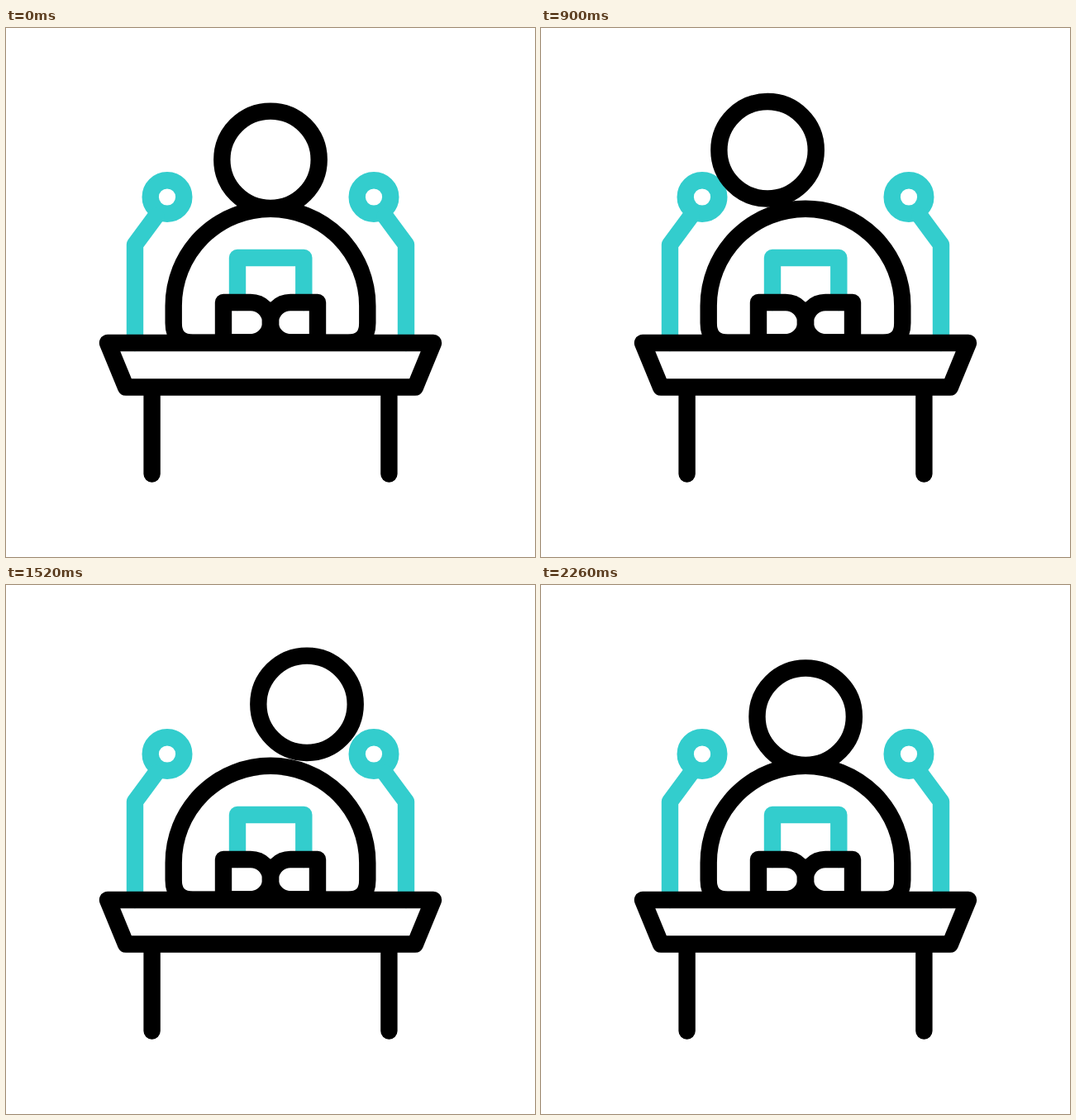
An HTML page for the animation above (2400 ms loop, 640 px wide and 640 px high).

```html
<!DOCTYPE html>
<html lang="en">
<head>
<meta charset="utf-8">
<title>Speaker at a desk</title>
<style>
  html, body { margin: 0; width: 100%; height: 100%; overflow: hidden; background: #fff; }
  svg { display: block; width: 100vw; height: 100vh; }
  .line { fill: none; stroke: #000; stroke-width: 20.4; stroke-linecap: round; stroke-linejoin: round; }
  .teal { stroke: #33cdcd; }
</style>
</head>
<body>
<svg viewBox="0 0 640 640">
  <defs>
    <g id="mic">
      <circle cx="195" cy="204.5" r="20.3"/>
      <path d="M181.5 227.5L156 262V381"/>
    </g>
    <path id="page" d="M263 332H296A24.2 24.2 0 0 1 296 380.4H263Z"/>
  </defs>
  <g class="line teal">
    <use href="#mic"/>
    <use href="#mic" transform="matrix(-1 0 0 1 640 0)"/>
  </g>
  <path class="line" d="M202.7 336A117.3 117.3 0 0 1 437.3 336V357Q437.3 380.6 414 380.6H226Q202.7 380.6 202.7 357Z"/>
  <circle id="head" class="line" cx="320" cy="159.3" r="58.7"/>
  <g id="book" class="line">
    <path class="teal" d="M280 332V278H360.3V332"/>
    <use href="#page"/>
    <use href="#page" transform="matrix(-1 0 0 1 640 0)"/>
  </g>
  <g class="line">
    <path d="M123 381H517L495 434.5H145Z"/>
    <path d="M176.6 436V539.5M463.4 436V539.5"/>
  </g>
</svg>
<script>
  const LOOP = 2400, STEP = 20;
  const head = document.getElementById('head');
  const book = document.getElementById('book');

  const part = (t, a, b) => Math.min(1, Math.max(0, (t - a) / (b - a)));
  const ease = (t, a, b) => (1 - Math.cos(Math.PI * part(t, a, b))) / 2;
  const pulse = (t, a, b, c, d) => ease(t, a, b) - ease(t, c, d);
  const nod = (t, a, b) => Math.sin(2 * Math.PI * part(t, a, b));
  const move = (el, x, y) => el.setAttribute('transform', `translate(${x.toFixed(2)} ${y.toFixed(2)})`);

  function draw(t) {
    // Lean to each microphone, with one nod at each side
    const left = pulse(t, 0, 440, 1030, 1290);
    const right = pulse(t, 1290, 1550, 2010, 2270);
    const nodLeft = nod(t, 490, 970);
    const nodRight = nod(t, 1610, 2005);
    move(head,
      -47.2 * left + 45.5 * right - 1.6 * nodLeft + 3 * nodRight,
      -15.5 * (left + right) - 5 * (nodLeft + nodRight));
    move(book, 0, -18 * pulse(t, 1620, 1860, 1960, 2220));
  }

  const start = performance.now();
  function frame() {
    const t = (performance.now() - start) % LOOP;
    draw(Math.floor(t / STEP) * STEP);
    requestAnimationFrame(frame);
  }
  draw(0);
  requestAnimationFrame(frame);
</script>
</body>
</html>
```
